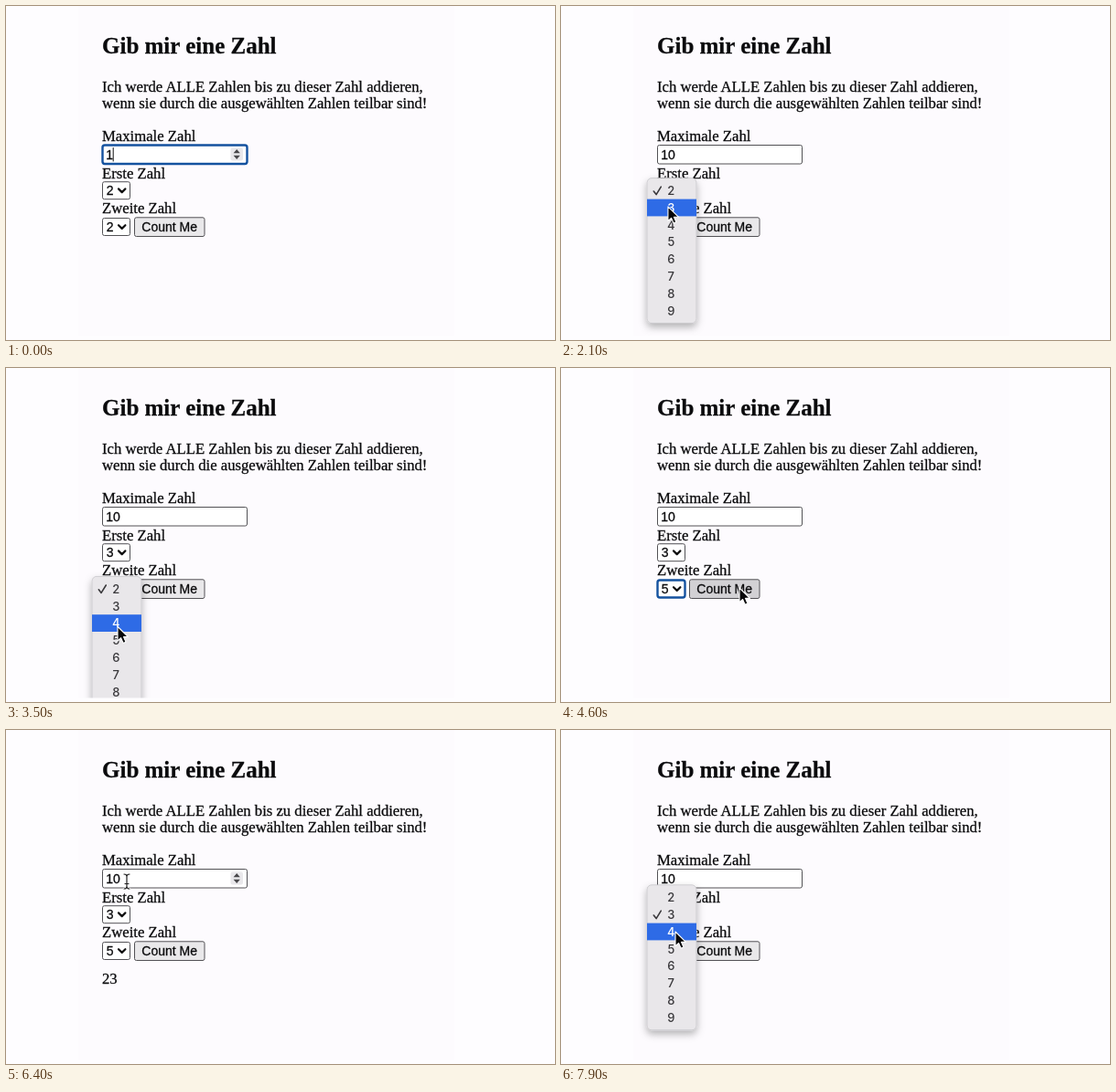
An HTML page that plays this animation: 600 px wide and 366 px high, repeating every 8 s.

```html
<!DOCTYPE html>
<html lang="de">
<head>
<meta charset="utf-8">
<title>Gib mir eine Zahl</title>
<style>
  html, body { margin: 0; width: 100%; height: 100%; overflow: hidden; background: #fefdff; }
  svg { display: block; width: 600px; height: 366px; }
  .page, .control { fill: #0b0b0d; stroke: #0b0b0d; stroke-width: .28px; }
  .page { font: 16.7px "Liberation Serif", "Times New Roman", serif; }
  .title { font-size: 25px; font-weight: bold; }
  .control { font: 14px "Liberation Sans", Arial, sans-serif; }
  .menu { font: 500 13px Inter, "Open Sans", sans-serif; fill: #39383b; text-anchor: middle; }
  .menu .active { fill: #fff; }
  .line { fill: none; stroke-linecap: round; stroke-linejoin: round; }
</style>
</head>
<body>
<svg viewBox="0 0 600 366">
  <defs>
    <filter id="shadow" x="-40%" y="-20%" width="180%" height="140%">
      <feDropShadow dx="0" dy="4" stdDeviation="4" flood-color="#000" flood-opacity=".3"/>
    </filter>
    <clipPath id="screen"><rect width="600" height="361.5"/></clipPath>
  </defs>
  <rect x="79" width="411" height="361.5" fill="#fdfbfe"/>
  <g class="page">
    <text class="title" x="105" y="52">Gib mir eine Zahl</text>
    <text x="105" y="93.8">Ich werde ALLE Zahlen bis zu dieser Zahl addieren,</text>
    <text x="105" y="112.2">wenn sie durch die ausgewählten Zahlen teilbar sind!</text>
    <text x="105" y="148">Maximale Zahl</text>
    <text x="105" y="188.5">Erste Zahl</text>
    <text x="105" y="227">Zweite Zahl</text>
  </g>
  <g id="form" class="control"></g>
  <g id="menus" class="menu" clip-path="url(#screen)"></g>
  <g id="pointer"></g>
</svg>
<script>
const LOOP = 8000, STEP = 100, ROW = 18.8, LEFT = 105.5;
const INPUT_BOTTOM = 171, FIRST = 202.2, SECOND = 242;
const layer = id => document.getElementById(id);
const ease = k => k * k * (3 - 2 * k);
const clamp = k => Math.max(0, Math.min(1, k));

// Each glide eases the pointer from where it rests to a new place.
const glide = (from, to, x, y) => ({ from, to, x, y });
const glides = [
  glide(100, 200, 151, 172),
  glide(700, 1200, 131, 195),
  glide(1300, 2500, 112, FIRST + 1.4 * ROW),
  glide(2500, 3100, 122, SECOND),
  glide(3200, 3600, 122, SECOND + 2.6 * ROW),
  glide(3600, 4200, 124, SECOND + 3 * ROW),
  glide(4200, 4600, 195, SECOND - 1),
  glide(5600, 6400, 132, 166),
  glide(6500, 7000, 128, FIRST - 2),
  glide(7200, 7900, 125, FIRST + ROW)
];

const menus = [
  { from: 1100, to: 2500, center: FIRST, chosen: 0 },
  { from: 2800, to: 4300, center: SECOND, chosen: 0 },
  { from: 7000, to: LOOP, center: FIRST, chosen: 1 }
];

function pointerAt(t) {
  let x = 154, y = 166;
  for (const g of glides) {
    const k = ease(clamp((t - g.from) / (g.to - g.from)));
    x += (g.x - x) * k;
    y += (g.y - y) * k;
  }
  return [x, y];
}

const box = (x, y, w, h, fill, stroke = "none", width = 1, r = 2) =>
  `<rect x="${x}" y="${y}" width="${w}" height="${h}" rx="${r}" fill="${fill}" stroke="${stroke}" stroke-width="${width}"/>`;
const label = (x, y, text, cls = "") => `<text x="${x}" y="${y}" class="${cls}">${text}</text>`;
const line = (d, color, width) => `<path class="line" d="${d}" stroke="${color}" stroke-width="${width}"/>`;
const frame = (y, w, h, focused) => focused
  ? box(LEFT, y, w, h, "#fff", "#14529f", 2.4, 2.5)
  : box(LEFT, y, w, h, "#fff", "#525155");

function input(digits, focused, hovered) {
  let out = frame(152.5, 158, 20.5, focused) + label(109.3, 167.8, digits);
  if (focused) out += line(`M${109.4 + digits.length * 7.8} 155.5v14.5`, "#111", 1);
  if (hovered) {
    out += box(245.5, 155.5, 13.5, 14, "#e9e8eb")
      + '<path d="M248.6 161.2l3.6 -4.2l3.6 4.2zM248.6 163.8l3.6 4.2l3.6 -4.2z" fill="#48474a" stroke="none"/>';
  }
  return out;
}

function select(center, value, focused) {
  return frame(center - 9.5, 30, 19, focused)
    + label(109.8, center + 4.9, value)
    + line(`M123 ${center - 1.8}l3.7 3.7l3.7 -3.7`, "#111", 2.2);
}

function button(hovered) {
  return box(140.5, 231.8, 76.5, 20.7, hovered ? "#d2d1d4" : "#e9e8ea", "#525155")
    + label(148.3, 246.8, "Count Me");
}

function form(t, x, y) {
  const typing = t < 1100;
  const onInput = y < INPUT_BOTTOM;
  const onButton = x > 140 && Math.abs(y - SECOND) < 11;
  return input(t < 400 ? "1" : "10", typing, onInput)
    + select(FIRST, t < 2600 ? 2 : 3, t >= 2600 && t < 2800)
    + select(SECOND, t < 4300 ? 2 : 5, t >= 4300 && t < 5100)
    + button(onButton)
    + (t < 5100 ? "" : label(105, 278, "23", "page"));
}

function menu({ from, to, center, chosen }, t, y) {
  if (t < from || t >= to) return "";
  const top = center - ROW * (chosen + .5);
  const active = Math.floor((y - top) / ROW);
  const opacity = to === LOOP ? 1 : clamp((to - t) / 300);
  let out = `<g opacity="${opacity}"><g filter="url(#shadow)">`
    + box(94, top - 4.2, 54, 8 * ROW + 8.6, "#e9e7ea", "#c2c0c4", .7, 5) + "</g>";
  for (let i = 0; i < 8; i++) {
    const mid = top + ROW * (i + .5);
    const lit = i === active;
    if (lit) out += box(94, mid - ROW / 2, 54, ROW, "#2e6be6", "none", 0, 0);
    out += label(120.3, mid + 4.7, i + 2, lit ? "active" : "");
    if (i === chosen) out += line(`M101.3 ${mid + .8}l2.8 3.6l5.2 -8.4`, lit ? "#fff" : "#39383b", 1.6);
  }
  return out + "</g>";
}

function pointer(t, x, y) {
  if (t < 100) return "";
  if (y < INPUT_BOTTOM) {
    const d = `M${x - 3} ${y - 8}q3 0 3 2.5v11q0 2.5 -3 2.5m6 -16q-3 0 -3 2.5v11q0 2.5 3 2.5m-5 -5.5h4`;
    return line(d, "#fff", 2.6) + line(d, "#222", 1.2);
  }
  return `<path transform="translate(${x} ${y})" d="M0 0V15.8L3.6 12.5L6.1 18.2L9 17L6.5 11.4H11.4Z"
    fill="#08080a" stroke="#fff" stroke-width="1.1" stroke-linejoin="round"/>`;
}

function render(t) {
  const [x, y] = pointerAt(t);
  layer("form").innerHTML = form(t, x, y);
  layer("menus").innerHTML = menus.map(m => menu(m, t, y)).join("");
  layer("pointer").innerHTML = pointer(t, x, y);
}

const start = performance.now();
let shown = -1;
function tick() {
  const t = Math.floor((performance.now() - start) % LOOP / STEP) * STEP;
  if (t !== shown) render(shown = t);
  requestAnimationFrame(tick);
}
tick();
</script>
</body>
</html>
```
